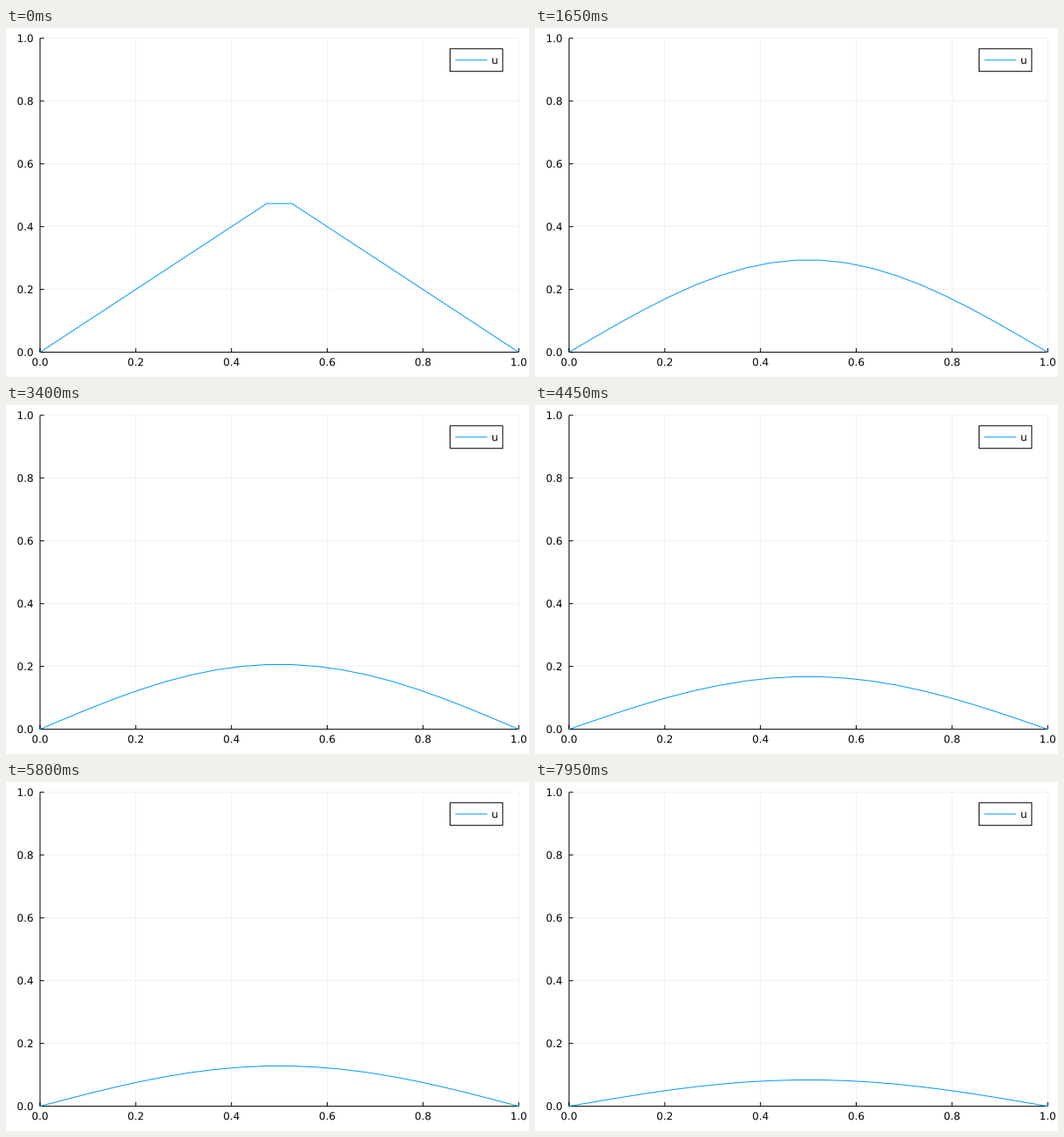
These frames come from a looping animation (600x400 px, 8 s). A matplotlib script:

```python
import numpy as np
import matplotlib.pyplot as plt
from matplotlib.animation import FuncAnimation
from matplotlib.patches import PathPatch, Rectangle
from matplotlib.textpath import TextPath
from matplotlib.transforms import Affine2D

W, H, DPI = 600, 400, 100
PX = 72 / DPI  # points per pixel
LEFT, RIGHT, TOP, BOTTOM = 39.03, 588.19, 11.81, 371.61
TICK, EM = 4.72, 12
BLUE = "#009AFA"
FRAMES, INTERVAL = 160, 50
N, DT = 20, 0.001

plt.rcParams["font.family"] = "DejaVu Sans"
fig = plt.figure(figsize=(W / DPI, H / DPI), dpi=DPI, facecolor="white")
ax = fig.add_axes([0, 0, 1, 1])
ax.set_xlim(0, W)
ax.set_ylim(H, 0)
ax.axis("off")


def px(x):
    return LEFT + (RIGHT - LEFT) * x


def py(y):
    return BOTTOM + (TOP - BOTTOM) * y


def line(xs, ys, color="black", width=1.0, **kw):
    return ax.plot(xs, ys, color=color, lw=width * PX, snap=False,
                   solid_capstyle="butt", **kw)[0]


def label(x, y, s, align=0.0):
    """Text outline on baseline y; align is the share of its width left of x."""
    # digits are 0.636 em wide and the point is 0.318 em
    width = EM * sum(0.318 if c == "." else 0.636 for c in s)
    place = Affine2D().scale(1, -1).translate(x - align * width, y)
    path = TextPath((0, 0), s, size=EM).transformed(place)
    ax.add_patch(PathPatch(path, fc="black", lw=0, snap=False, zorder=5))


def heat_steps():
    """Explicit diffusion of a triangle with both ends held at zero."""
    x = np.linspace(0, 1, N)
    u = np.minimum(x, 1 - x)
    r = DT * (N - 1) ** 2
    rows = [u]
    for _ in range(FRAMES - 1):
        u = u.copy()
        u[1:-1] += r * np.diff(u, 2)
        rows.append(u)
    return x, rows


grid = dict(alpha=0.1, width=0.5, zorder=1)
for t in [k / 5 for k in range(6)]:
    x, y = px(t), py(t)
    line([x, x], [TOP, BOTTOM], **grid)
    line([LEFT, RIGHT], [y, y], **grid)
    line([x, x], [BOTTOM, BOTTOM - TICK], zorder=2)
    line([LEFT, LEFT + TICK], [y, y], zorder=2)
    label(x, 387.2, f"{t:.1f}", 0.5)
    label(31.6, y + 4.35, f"{t:.1f}", 1.0)
line([LEFT, RIGHT], [BOTTOM, BOTTOM], zorder=2)
line([LEFT, LEFT], [BOTTOM, TOP], zorder=2)

xs, rows = heat_steps()
curve = line(px(xs), py(rows[0]), BLUE, zorder=3)

ax.add_patch(Rectangle((509.4, 23.8), 60.48, 25.92, fc="white", ec="black",
                       lw=PX, snap=False, zorder=4))
line([515.5, 552.1], [36.76, 36.76], BLUE, zorder=5)
label(557, 41.1, "u")


def draw(i):
    curve.set_ydata(py(rows[i]))
    return (curve,)


anim = FuncAnimation(fig, draw, frames=FRAMES, interval=INTERVAL,
                     repeat=True, repeat_delay=0)
plt.show()
```
